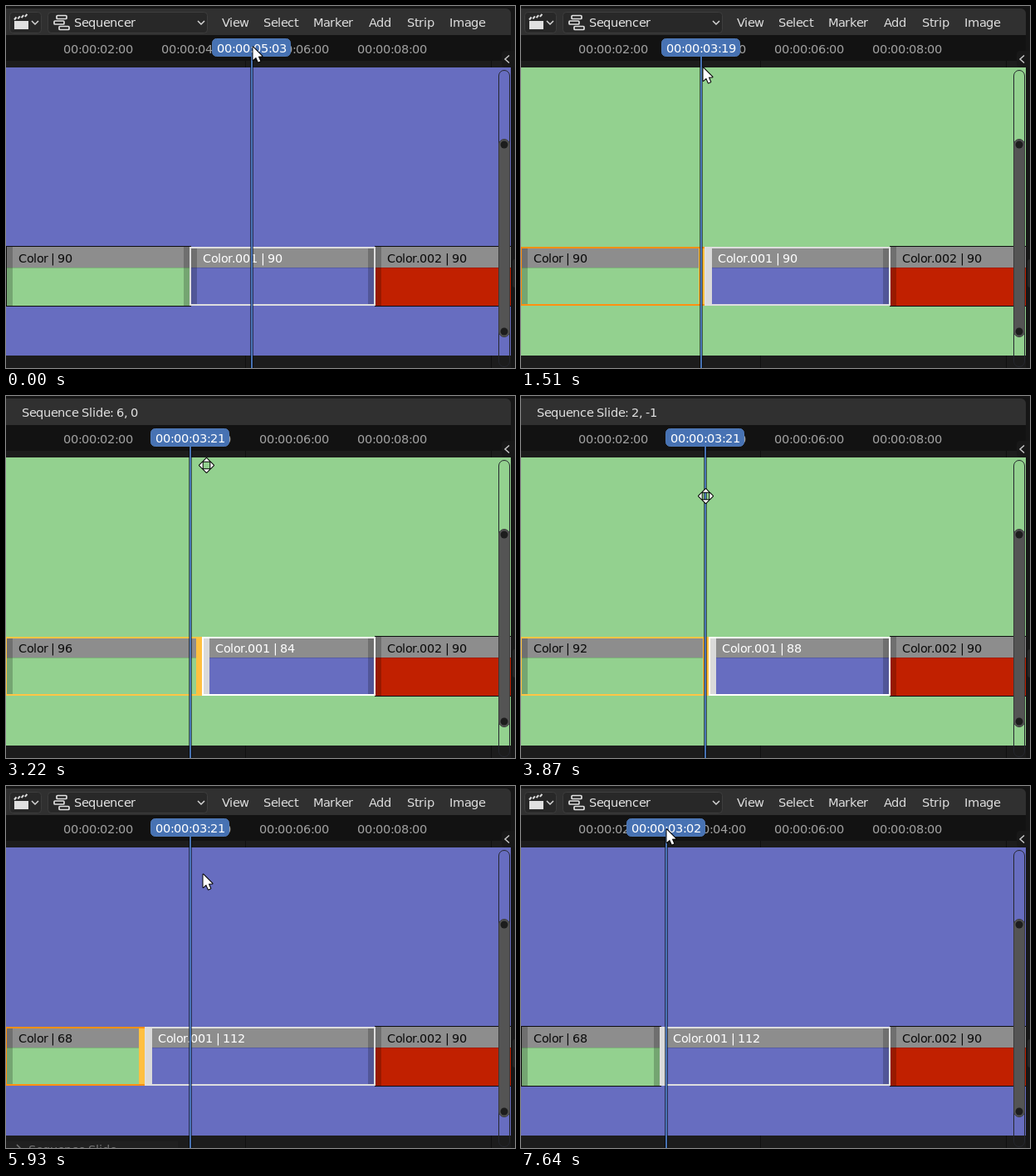
Animation, 613 px wide and 436 px high, one loop 8000 ms. Source, as an HTML page with a canvas:

```html
<!DOCTYPE html>
<html lang="en">
<head>
<meta charset="utf-8">
<title>Sequence slide</title>
<style>
html, body { margin: 0; width: 100%; height: 100%; overflow: hidden; background: #161616; }
canvas { display: block; }
</style>
</head>
<body>
<canvas id="stage" width="613" height="436"></canvas>
<script>
const ctx = document.getElementById('stage').getContext('2d');
const LOOP = 8000;
const GREEN = '#93d18f', BLUE = '#676dc0', RED = '#c12000', ACCENT = '#4772b3';
const SHADE = 'rgba(0,0,0,.21)';
const CUT = 93;            // frame where the first two strips meet
const FRAME_WIDTH = 2.467;

// Times at which the user does something
const SELECT = 310, SCRUB = 1600, GRAB = 2860, CONFIRM = 4440, CLICK = 6120;

const frameX = f => Math.round(222 + (f - CUT) * FRAME_WIDTH);
const isSliding = t => t >= GRAB && t < CONFIRM;

// Progress from 0 to 1 between two times
const ramp = (t, t0, t1) => Math.min(1, Math.max(0, (t - t0) / (t1 - t0)));
const glide = (a, b, u) => a + (b - a) * u;
const glidePoint = (a, b, u) => [glide(a[0], b[0], u), glide(a[1], b[1], u)];

// A swing to the right, then an accelerating pull to the left
const slideAt = t => 15 * ramp(t, 3050, 3450) - 37 * ramp(t, 3450, 4170) ** 2;

function headAt(t) {
  if (t < SELECT) return 123;
  if (t < SCRUB) return 91;
  if (t < CLICK) return CUT;
  return glide(103, 74, ramp(t, CLICK, 7640));
}

function cursorAt(t) {
  if (t < SELECT) return [297, 49];
  if (t < SCRUB) return glidePoint([203, 55], [219, 74], ramp(t, 600, 1430));
  if (t < GRAB) return glidePoint([222, 75], [223, 77], ramp(t, 2370, 2540));
  if (t < CONFIRM) // the pointer leads the strips a little
    return [222 + slideAt(t + 35) * FRAME_WIDTH, glide(78, 120, ramp(t, 3130, 3870))];
  if (t < 5240) return glidePoint([168, 120], [178, 304], ramp(t, CONFIRM, 5080));
  if (t < CLICK) return glidePoint([178, 304], [253, 52], ramp(t, 5240, CLICK));
  return [frameX(headAt(t)), 52];
}

function rect(x, y, w, h, color) {
  ctx.fillStyle = color;
  ctx.fillRect(x, y, w, h);
}

function box(x, y, w, h, r, fill, stroke, width = 1) {
  ctx.beginPath();
  ctx.roundRect(x, y, w, h, r);
  if (fill) { ctx.fillStyle = fill; ctx.fill(); }
  if (stroke) { ctx.strokeStyle = stroke; ctx.lineWidth = width; ctx.stroke(); }
}

function path(points, close) {
  ctx.beginPath();
  points.forEach(([x, y]) => ctx.lineTo(x, y));
  if (close) ctx.closePath();
}

function line(points, color, width) {
  path(points);
  ctx.strokeStyle = color;
  ctx.lineWidth = width;
  ctx.stroke();
}

const setFont = size => { ctx.font = `${size}px "DejaVu Sans", sans-serif`; };

const advances = {};
function advance(ch) {
  if (!(ch in advances)) {
    setFont(1000);
    advances[ch] = ctx.measureText(ch).width / 1000;
  }
  return advances[ch];
}

// Glyphs sit on whole pixels, with advances cut to integers
function text(str, x, y, color, size = 14.6) {
  const steps = [...str].map(ch => Math.floor(advance(ch) * size));
  setFont(size);
  ctx.fillStyle = color;
  [...str].forEach((ch, i) => {
    ctx.fillText(ch, x, y);
    x += steps[i];
  });
}

function timecode(frame) {
  const pad = n => String(n).padStart(2, '0');
  return `00:00:${pad(Math.floor(frame / 24))}:${pad(frame % 24)}`;
}

const chevronDown = x => line([[x - 4, 18], [x, 22], [x + 4, 18]], '#d6d6d6', 1.5);

function drawMenus() {
  box(4.5, 7.5, 38, 25, 4, '#282828', '#3d3d3d');
  box(50.5, 7.5, 192, 25, 4, '#282828', '#3d3d3d');
  rect(10, 18, 17, 10, '#e0e0e0');
  for (let i = 0; i < 4; i++) {
    const x = 10 + i * 4.3, y = 15.5 - i * 1.2;
    line([[x, y + 1], [x + 2.5, y - 2]], '#e0e0e0', 2);
  }
  chevronDown(35);
  [60, 57, 63].forEach((x, i) => box(x + 1, 11.5 + i * 6.5, 12, 4, 1, null, '#e0e0e0', 1.7));
  text('Sequencer', 82, 25, '#e4e4e4');
  chevronDown(235);
  const menus = { View: 260, Select: 310, Marker: 370, Add: 437, Strip: 483, Image: 534 };
  for (const name in menus) text(name, menus[name], 25, '#dedede');
}

function drawFrame(backdrop) {
  rect(0, 0, 613, 436, '#161616');
  box(-8, 3, 616, 40, 6, '#303030');
  rect(0, 35, 608, 31, '#121212');
  rect(0, 66, 608, 370, '#1c1c1c');
  for (const x of [288, 584]) rect(x, 66, 1, 370, '#101010');
  rect(0, 74, 608, 347, backdrop);
  for (let i = 0; i < 4; i++)
    text(timecode(48 * (i + 1)), 69 + 118 * i, 57, '#a0a0a0');
}

function drawStrip({ x0, x1, color, label, outline, left, right, ink = '#0a0a0a' }) {
  const w = x1 - x0;
  rect(x0, 290, w, 71, color);
  rect(x0, 290, w, 25, '#8d8d8d');
  rect(x0, 315, w, 1, 'rgba(0,0,0,.15)');
  rect(x0, 290, 8, 71, left || SHADE);
  rect(x1 - 8, 290, 8, 71, right || SHADE);
  ctx.strokeStyle = outline || '#0c0c0c';
  ctx.lineWidth = outline ? 2 : 1;
  if (outline) ctx.strokeRect(x0, 291, w, 69);
  else ctx.strokeRect(x0 + 0.5, 289.5, w, 72);
  text(label, x0 + 15, 309, ink, 14.4);
}

function drawStrips(t, slide) {
  const handles = t >= SELECT;
  const paired = handles && t < CLICK;
  const edge = frameX(CUT + slide);
  drawStrip({ x0: 444, x1: 666, color: RED, label: 'Color.002 | 90' });
  drawStrip({
    x0: 0, x1: edge, color: GREEN, label: `Color | ${90 + slide}`,
    outline: paired && (isSliding(t) ? '#ffc545' : '#ff9010'), right: paired && '#ffc040'
  });
  drawStrip({
    x0: edge, x1: 444, color: BLUE, label: `Color.001 | ${90 - slide}`, ink: '#fff',
    outline: isSliding(t) ? '#fff' : '#dedede', left: handles && '#dadada'
  });
}

function drawScrollbar() {
  rect(608, 74, 5, 362, '#161616');
  box(610, 305, 8, 34, 3, '#252525');
  box(593.5, 77.5, 13, 357, 6.5, null, '#25272e');
  box(593.5, 160.5, 13, 238, 6.5, '#545454', '#3a3a3a');
  for (const y of [167, 392]) {
    ctx.beginPath();
    ctx.arc(600, y, 4.5, 0, Math.PI * 2);
    ctx.fillStyle = '#1d1d1d';
    ctx.fill();
  }
  box(597, 54, 20, 20, 4, '#181818');
  line([[606, 59.5], [601, 64], [606, 68.5]], '#c8c8c8', 1.5);
}

function drawPlayhead(frame) {
  const x = frameX(frame);
  rect(x - 2, 61, 4, 375, 'rgba(0,0,0,.55)');
  rect(x - 1, 61, 2, 375, ACCENT);
  box(x - 47.5, 39.5, 94, 21, 5, ACCENT, '#4f7ab8');
  text(timecode(frame), x - 42, 56, '#fff');
}

function outlined(points) {
  path(points, true);
  ctx.lineJoin = 'round';
  ctx.strokeStyle = '#000';
  ctx.lineWidth = 2;
  ctx.stroke();
  ctx.fillStyle = '#fff';
  ctx.fill();
  ctx.lineJoin = 'miter';
}

function drawCursor(x, y, moving) {
  ctx.save();
  ctx.translate(x + 0.5, y + 0.5);
  if (moving) {
    for (let i = 0; i < 4; i++) {
      outlined([[8.5, 0], [4.8, -3.7], [4.8, 3.7]]);
      ctx.rotate(Math.PI / 2);
    }
  } else {
    outlined([[0, 0], [0, 15.5], [3.6, 12.2], [6.2, 18], [8.8, 16.9], [6.3, 11.2], [11, 11]]);
  }
  ctx.restore();
}

// Corner of the operator panel
function drawPanel() {
  rect(0, 428, 207, 8, '#202020');
  line([[13, 432], [17, 436], [13, 440]], '#707070', 1.5);
  text('Sequence Slide', 27, 443, '#707070');
}

function draw(t) {
  const slide = Math.round(slideAt(t));
  const head = Math.round(headAt(t));
  const [cx, cy] = cursorAt(t).map(Math.round);

  drawFrame(head < CUT + slide ? GREEN : BLUE);
  if (isSliding(t)) {
    const row = -Math.round((cy - 78) / 72);
    text(`Sequence Slide: ${slide}, ${row}`, 19, 25, '#e0e0e0');
  } else {
    drawMenus();
  }
  if (t >= 4520 && t < 6500) drawPanel();
  drawStrips(t, slide);
  drawScrollbar();
  drawPlayhead(head);
  drawCursor(cx, cy, isSliding(t));
}

const start = performance.now();
function tick() {
  draw((performance.now() - start) % LOOP);
  requestAnimationFrame(tick);
}
tick();
</script>
</body>
</html>
```
